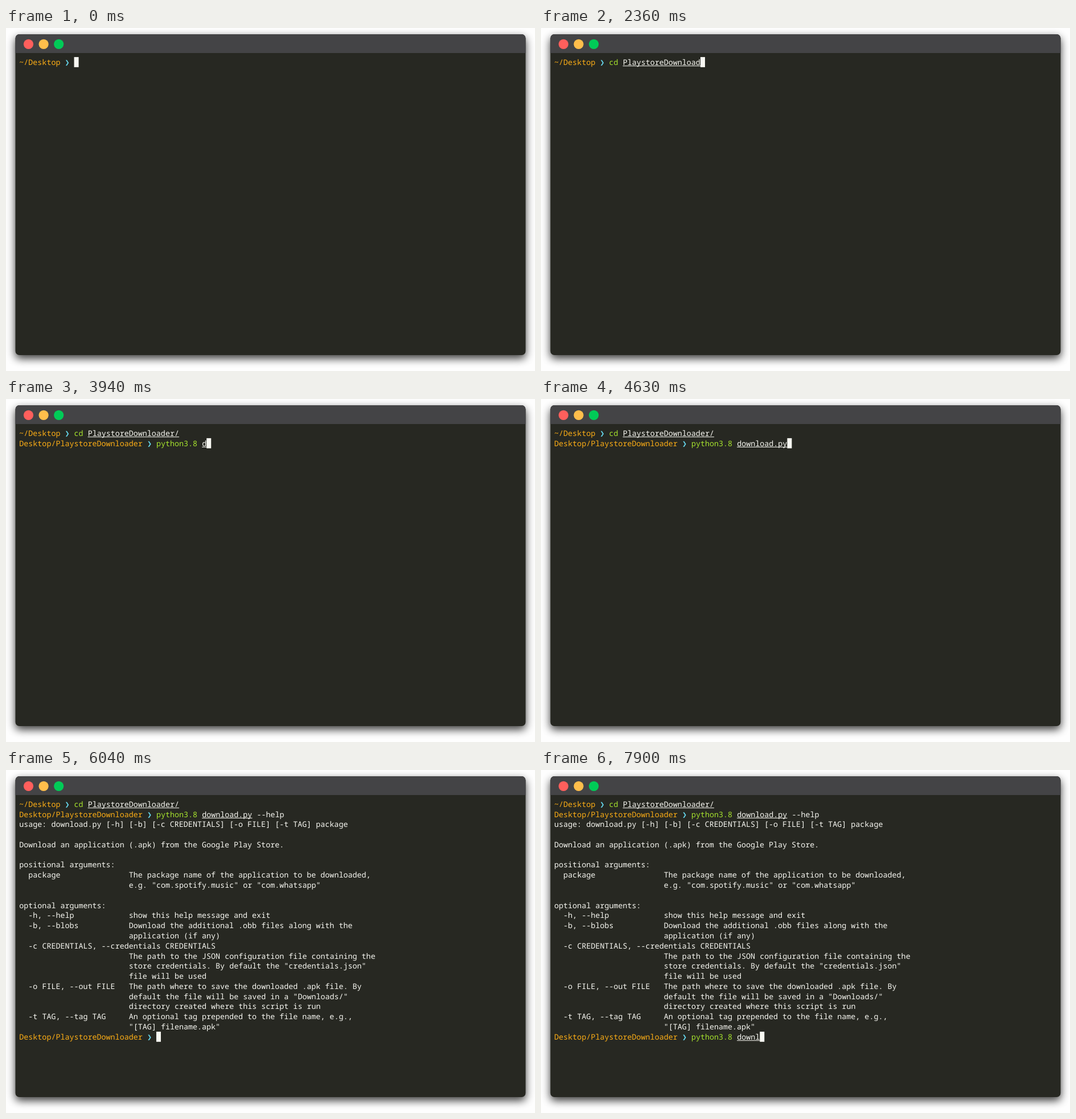
An HTML page for the animation above (8000 ms loop, 929 by 603 pixels).

```html
<!DOCTYPE html>
<html lang="en">
<head>
<meta charset="utf-8">
<title>Terminal</title>
<style>
  html, body { margin: 0; width: 100%; height: 100%; overflow: hidden; background: #fefefe; }
  svg { display: block; width: 929px; height: 603px; }
  text {
    font: 13.37px "Noto Sans Mono", "DejaVu Sans Mono", monospace;
    white-space: pre; text-rendering: geometricPrecision; fill: #f8f8f2;
  }
  .path { fill: #fdae16; }
  .arrow { fill: #66d9ef; font-family: "DejaVu Sans Mono", "DejaVu Sans", monospace; font-weight: bold; }
  .known { fill: #a6e22e; }
  .unknown { fill: #f92672; font-weight: bold; }
  .box { fill: #f8f8f2; }
</style>
</head>
<body>
<svg viewBox="0 0 929 603" xmlns="http://www.w3.org/2000/svg">
  <defs>
    <filter id="blur" x="-10%" y="-10%" width="120%" height="120%">
      <feGaussianBlur stdDeviation="7.5"/>
    </filter>
  </defs>
  <rect x="16.5" y="17" width="896" height="564" rx="7" fill="#000" opacity=".78" filter="url(#blur)"/>
  <rect x="16.5" y="11" width="896" height="564" rx="7" fill="#272822"/>
  <path d="M16.5 44V18a7 7 0 0 1 7-7h882a7 7 0 0 1 7 7V44z" fill="#444446"/>
  <circle cx="39.5" cy="28.3" r="8.6" fill="#ff5f5c"/>
  <circle cx="66.1" cy="28.3" r="8.6" fill="#ffbe4b"/>
  <circle cx="92.7" cy="28.3" r="8.6" fill="#00cb57"/>
  <g id="screen"></g>
</svg>
<script>
const LOOP = 8000, LEFT = 23.3, TOP = 51.1, CELL_W = 8.022, CELL_H = 17.78, BASE = 13.7;
const screen = document.getElementById('screen');

const HELP = `usage: download.py [-h] [-b] [-c CREDENTIALS] [-o FILE] [-t TAG] package

Download an application (.apk) from the Google Play Store.

positional arguments:
  package               The package name of the application to be downloaded,
                        e.g. "com.spotify.music" or "com.whatsapp"

optional arguments:
  -h, --help            show this help message and exit
  -b, --blobs           Download the additional .obb files along with the
                        application (if any)
  -c CREDENTIALS, --credentials CREDENTIALS
                        The path to the JSON configuration file containing the
                        store credentials. By default the "credentials.json"
                        file will be used
  -o FILE, --out FILE   The path where to save the downloaded .apk file. By
                        default the file will be saved in a "Downloads/"
                        directory created where this script is run
  -t TAG, --tag TAG     An optional tag prepended to the file name, e.g.,
                        "[TAG] filename.apk"`.split('\n');

const KNOWN = ['cd', 'python', 'python3', 'python3.8'];
const PROJECT = 'Desktop/PlaystoreDownloader';
const RUN = 'python3.8 download.py --help';

// Bursts of typing: [first key, last key, steps, first length, last length]
const PROMPTS = [
  { at: 0, row: 0, dir: '~/Desktop', cmd: 'cd PlaystoreDownloader/', bursts: [
    [860, 1560, 8, 1, 8], [1620, 1620, 1, 9, 9], [1680, 2360, 10, 10, 20], [2490, 2610, 3, 21, 23]] },
  { at: 3140, row: 1, dir: PROJECT, cmd: RUN, bursts: [
    [3200, 3260, 2, 1, 2], [3450, 3510, 2, 3, 4], [3590, 4190, 9, 5, 16],
    [4320, 4630, 5, 17, 21], [4760, 5120, 7, 22, 28]] },
  { at: 6040, row: 23, dir: PROJECT, cmd: RUN, bursts: [
    [6830, 7280, 6, 1, 6], [7340, 7590, 3, 7, 10], [7650, 7900, 4, 11, 15]] },
];
const ENTER = 5780, OUTPUT = 6040;

const colX = col => LEFT + col * CELL_W;
const rowY = row => TOP + row * CELL_H;
const escape = s => s.replace(/&/g, '&amp;').replace(/</g, '&lt;');
const text = (col, row, s, cls = '') =>
  `<text class="${cls}" x="${colX(col)}" y="${rowY(row) + BASE}">${escape(s)}</text>`;
const box = (col, row, cells, dy, h) =>
  `<rect class="box" x="${colX(col)}" y="${rowY(row) + dy}" width="${cells * CELL_W}" height="${h}"/>`;
const cursor = (col, row) => box(col, row, 1, 0, CELL_H);

function typed(bursts, t) {
  let n = 0;
  for (const [t0, t1, steps, from, to] of bursts) {
    if (t < t0) break;
    const last = steps - 1;
    const i = last ? Math.min(last, Math.floor((t - t0) / (t1 - t0) * last + 1e-6)) : 0;
    n = last ? Math.round(from + (to - from) * i / last) : from;
  }
  return n;
}

function command(col, row, s) {
  const [name, arg = '', flag = ''] = s.split(' ');
  const argCol = col + name.length + 1;
  let out = text(col, row, name, KNOWN.includes(name) ? 'known' : 'unknown');
  if (arg) out += text(argCol, row, arg) + box(argCol, row, arg.length, 15.1, 1);
  if (flag) out += text(argCol + arg.length + 1, row, flag);
  return out;
}

function draw(t) {
  let out = '', caret = '';
  for (const { at, row, dir, cmd, bursts } of PROMPTS) {
    if (t < at) break;
    const n = typed(bursts, t), start = dir.length + 3;
    out += text(0, row, dir, 'path') + text(dir.length + 1, row, '❯', 'arrow');
    if (n) out += command(start, row, cmd.slice(0, n));
    caret = cursor(start + n, row);
  }
  if (t >= OUTPUT) HELP.forEach((line, i) => {
    const indent = line.search(/\S/);
    if (indent >= 0) out += text(indent, i + 2, line.slice(indent));
  });
  else if (t >= ENTER) caret = cursor(0, 2);
  return out + caret;
}

let shown = '', start;
function tick(now) {
  start ??= now;
  const next = draw((now - start) % LOOP);
  if (next !== shown) screen.innerHTML = shown = next;
  requestAnimationFrame(tick);
}
screen.innerHTML = shown = draw(0);
requestAnimationFrame(tick);
</script>
</body>
</html>
```
